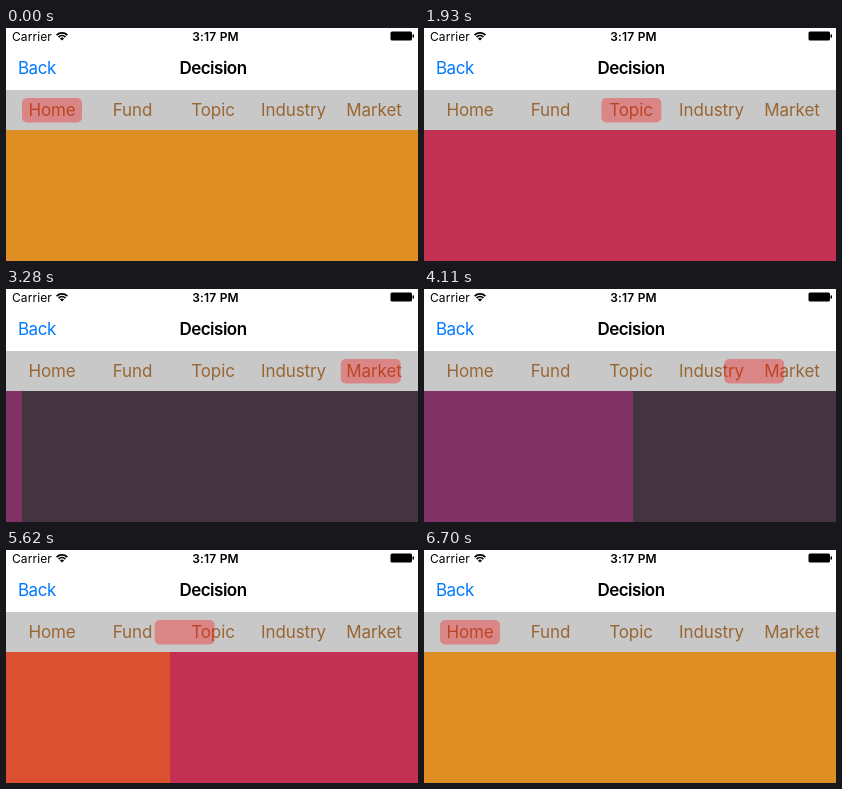
Recreate the animation shown at these times as an HTML page with a canvas. Size 412 by 233 pixels, loop 8290 ms.

```html
<!DOCTYPE html>
<html lang="en">
<head>
<meta charset="utf-8">
<title>Tab pager</title>
<style>
html, body { margin: 0; width: 100%; height: 100%; overflow: hidden; background: #fff; }
canvas { display: block; width: 412px; height: 233px; }
</style>
</head>
<body>
<canvas id="stage"></canvas>
<script>
const W = 412, H = 233, LOOP = 8290;
const TAB_STEP = 80.7, PILL_LAG = 10, LEAD = 25;
const FONT = 'Inter, Roboto, sans-serif';

const pages = [
  { name: 'Home', color: '#de8e22' },
  { name: 'Fund', color: '#db5030' },
  { name: 'Topic', color: '#c23054' },
  { name: 'Industry', color: '#803264' },
  { name: 'Market', color: '#443440' }
];

// start, end, target page, sharpness of the deceleration
const swipes = [
  [810, 1280, 1, 2.7],
  [1580, 1930, 2, 2.7],
  [2260, 2740, 3, 2.7],
  [2980, 3400, 4, 2.7],
  [3970, 4430, 3, 2.07],
  [4790, 5310, 2, 3.11],
  [5550, 6030, 1, 3.2],
  [6330, 6700, 0, 2.7]
];

const canvas = document.getElementById('stage');
const ctx = canvas.getContext('2d');
const dpr = window.devicePixelRatio || 1;
canvas.width = W * dpr;
canvas.height = H * dpr;
ctx.scale(dpr, dpr);

function pageAt(ms) {
  let page = 0;
  for (const [start, end, target, sharp] of swipes) {
    if (ms < start) break;
    const t = Math.min(1, (ms - start + LEAD) / (end - start + LEAD));
    page += (target - page) * (1 - Math.pow(1 - Math.pow(t, 1.15), sharp));
  }
  return page;
}

function rect(x, y, w, h, color) {
  ctx.fillStyle = color;
  ctx.fillRect(x, y, w, h);
}

function roundRect(x, y, w, h, r, color) {
  ctx.fillStyle = color;
  ctx.beginPath();
  ctx.roundRect(x, y, w, h, r);
  ctx.fill();
}

function text(str, x, y, { size = 17, weight = 400, color = '#000', align = 'left', spacing = 0 } = {}) {
  ctx.font = `${weight} ${size}px ${FONT}`;
  ctx.letterSpacing = spacing + 'px';
  ctx.textAlign = align;
  ctx.fillStyle = color;
  ctx.fillText(str, x, y);
}

function wifi(x, y) {
  const from = -Math.PI * 0.75, to = -Math.PI * 0.25;
  ctx.strokeStyle = ctx.fillStyle = '#000';
  ctx.lineWidth = 1.8;
  for (const r of [7.6, 4.8]) {
    ctx.beginPath();
    ctx.arc(x, y, r, from, to);
    ctx.stroke();
  }
  ctx.beginPath();
  ctx.moveTo(x, y);
  ctx.arc(x, y, 2.9, from, to);
  ctx.fill();
}

function battery() {
  roundRect(384.5, 3.5, 21.5, 9, 1.5, '#000');
  roundRect(406.5, 6.2, 1.5, 3.6, 0.7, '#000');
}

function header() {
  rect(0, 0, W, 62, '#fff');
  text('Carrier', 6, 13, { size: 12, spacing: 0.1 });
  wifi(56, 12.5);
  text('3:17 PM', 209.5, 13, { size: 12, weight: 600, align: 'center', spacing: 0.2 });
  battery();
  text('Back', 12, 46, { color: '#007aff', spacing: -0.5 });
  text('Decision', 207, 46, { weight: 600, align: 'center', spacing: -0.5 });
}

function tabs(page) {
  rect(0, 62, W, 40, '#c8c8c8');
  pages.forEach(({ name }, i) =>
    text(name, 46 + i * 80.5, 88, { color: '#996633', align: 'center', spacing: -0.1 }));
  roundRect(16 + page * TAB_STEP, 70, 60, 24.5, 5, 'rgba(255,0,0,0.33)');
}

function content(page) {
  pages.forEach(({ color }, i) => {
    const x = Math.round((i - page) * W);
    if (Math.abs(x) < W) rect(x, 102, W, H - 102, color);
  });
}

function draw(now) {
  const ms = now % LOOP;
  header();
  content(pageAt(ms));
  tabs(pageAt(ms - PILL_LAG));
}

let origin;
function tick(now) {
  origin ??= now;
  draw(now - origin);
  requestAnimationFrame(tick);
}
draw(0);
requestAnimationFrame(tick);
</script>
</body>
</html>
```
